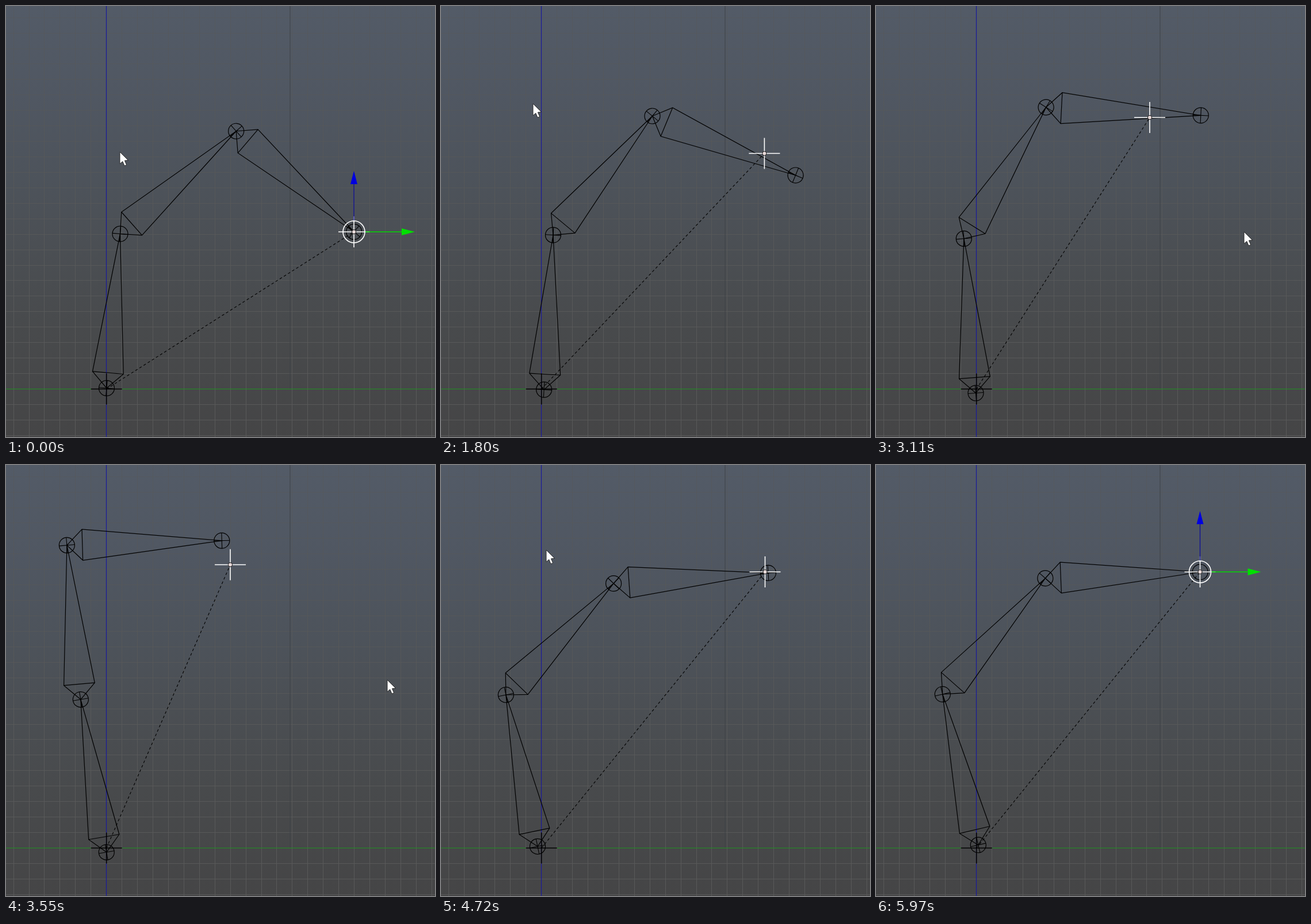
Recreate the animation shown at these times as an HTML page with a canvas. Size 746 px wide and 750 px high, loop 6.07 s.

```html
<!DOCTYPE html>
<html lang="en">
<head>
<meta charset="utf-8">
<title>Bone chain</title>
<style>
html, body { margin: 0; width: 100%; height: 100%; overflow: hidden; background: #4a4d51; }
canvas { display: block; }
</style>
</head>
<body>
<canvas id="stage" width="746" height="750"></canvas>
<script>
const ctx = document.getElementById('stage').getContext('2d');
const W = 746, H = 750, LOOP = 6070;
const BONE = 269.5, JOINT = 13.5, CROSS = 27;
const ORIGIN = { x: 174.7, y: 666.5 };
const POINTER_END = 5280, HANDLES_BACK = 4950;

// runs of evenly spaced steps: [first, last, count]
const steps = [
  [120, 700, 6], [820, 1380, 6], [1480, 2020, 6], [2140, 2690, 6], [2790, 3330, 6],
  [3430, 4030, 6], [4150, 4250, 2], [4390, 4950, 6], [5060, 5620, 6], [5750, 5970, 3]
].flatMap(([first, last, n]) => Array.from({ length: n },
  (_, k) => Math.floor((first + (last - first) * k / (n - 1)) / 10) * 10));

// [time, root x, root y, three bone angles from upright]
const CHAIN = [
  [0, 175, 665, 5, 48.45, 130.5],
  [820, 176, 667, 4, 39.5, 127],
  [1150, 175.5, 666, 4.4, 45, 129.4],
  [1430, 175, 666, 5.5, 49, 130.5],
  [2020, 181, 669, 1.5, 30, 101],
  [2360, 179, 671, -1.1, 5.6, 95.1],
  [2800, 173.5, 675.5, -5.2, 29, 96.5],
  [3110, 173.5, 673.5, -4.4, 32, 93],
  [3430, 174.5, 674.4, -8.7, -3, 82],
  [3550, 174.8, 673.8, -9.6, -5.1, 88.3],
  [4030, 170, 673.5, -16.5, 25, 92],
  [4250, 168, 671, -14, 38, 88],
  [4720, 168, 663.8, -11.8, 44, 86.1],
  [4950, 170, 660.5, -12.3, 43.3, 86.6],
  [5970, 177.8, 661.2, -13.3, 41.5, 87.7]
];

// [time, x, y]
const GOAL = [
  [0, 605, 393], [820, 568, 348], [1150, 604, 390], [1430, 627, 404], [2020, 510, 185],
  [2360, 453, 179], [2800, 578, 214], [3110, 476, 194], [3430, 365, 168],
  [3550, 390, 173.5], [4030, 567, 186], [4250, 563.5, 186]
];

// [time, x, y]; a wide gap is a wrap across the view
const POINTER = [
  [0, 198, 254], [820, 170, 212], [1150, 203, 250], [1380, 224, 262], [1800, 160, 170],
  [1910, 720, 394], [2360, 705, 382], [2580, 190, 410], [3000, 145, 405],
  [3110, 640, 393], [3550, 663, 374], [3780, 130, 150], [4150, 183, 148]
];

function locate(rows, t) {
  let i = 0;
  while (i < rows.length - 2 && rows[i + 1][0] <= t) i++;
  return i;
}

// tangent that never overshoots a turning point
function slope(rows, i, c) {
  if (i === 0 || i === rows.length - 1) return 0;
  const rate = k => (rows[k + 1][c] - rows[k][c]) / (rows[k + 1][0] - rows[k][0]);
  const a = rate(i - 1), b = rate(i);
  return a * b > 0 ? 2 * a * b / (a + b) : 0;
}

function sample(rows, t) {
  const i = locate(rows, t), a = rows[i], b = rows[i + 1];
  const span = b[0] - a[0], u = Math.min(1, (t - a[0]) / span);
  const ease = u * u * (3 - 2 * u);
  return a.map((from, c) => from + (b[c] - from) * ease +
    span * u * (1 - u) * ((1 - u) * slope(rows, i, c) - u * slope(rows, i + 1, c))).slice(1);
}

function pointerAt(t) {
  const i = locate(POINTER, t), a = POINTER[i], b = POINTER[i + 1];
  const wraps = Math.abs(b[1] - a[1]) > 300;
  const u = wraps ? Number(t >= b[0]) : Math.min(1, (t - a[0]) / (b[0] - a[0]));
  return { x: a[1] + (b[1] - a[1]) * u, y: a[2] + (b[2] - a[2]) * u };
}

function trace(points, color, width = 1.2, closed = false) {
  ctx.beginPath();
  points.forEach(([x, y]) => ctx.lineTo(x, y));
  if (closed) ctx.closePath();
  ctx.strokeStyle = color;
  ctx.lineWidth = width;
  ctx.stroke();
}

function ring(x, y, r, color, width) {
  ctx.beginPath();
  ctx.arc(x, y, r, 0, 2 * Math.PI);
  ctx.strokeStyle = color;
  ctx.lineWidth = width;
  ctx.stroke();
}

function fill(points, color) {
  ctx.beginPath();
  points.forEach(([x, y]) => ctx.lineTo(x, y));
  ctx.closePath();
  ctx.fillStyle = color;
  ctx.fill();
}

function plus({ x, y }, r, color, width) {
  trace([[x - r, y], [x + r, y]], color, width);
  trace([[x, y - r], [x, y + r]], color, width);
}

function fade(...stops) {
  const g = ctx.createLinearGradient(0, 0, 0, H);
  stops.forEach(([p, color]) => g.addColorStop(p, color));
  return g;
}

function backdrop() {
  ctx.fillStyle = fade([0, '#535b67'], [0.21, '#505762'], [0.4, '#4d535b'],
    [0.55, '#4b4f54'], [0.75, '#484a4c'], [1, '#454546']);
  ctx.fillRect(0, 0, W, H);

  const ink = fade([0, '#58575466'], [0.22, '#58585699'], [0.6, '#595a5ae6'], [1, '#5a5a5af2']);
  const cell = 26.93;
  for (let x = ORIGIN.x % cell; x < W; x += cell) {
    const px = Math.floor(x) + 0.5;
    trace([[px, 0], [px, H]], ink, 1);
  }
  for (let y = ORIGIN.y % cell; y < H; y += cell) {
    const py = Math.floor(y) + 0.5;
    trace([[0, py], [W, py]], ink, 1);
  }
  trace([[494, 0], [494, 666]], '#3e4246', 1);
  trace([[0, 666.5], [W, 666.5]], '#209020', 1);
  trace([[174.5, 0], [174.5, H]], '#1a1a9c', 1.2);
}

function joint(p, angle) {
  ctx.save();
  ctx.translate(p.x, p.y);
  ctx.rotate(angle);
  ring(0, 0, JOINT, '#000', 1.2);
  plus({ x: 0, y: 0 }, JOINT, '#000', 1.1);
  ctx.restore();
}

function bone(base, angle) {
  const dx = Math.sin(angle), dy = -Math.cos(angle), q = BONE / 10;
  const tip = { x: base.x + BONE * dx, y: base.y + BONE * dy };
  const left = [base.x + q * (dx + dy), base.y + q * (dy - dx)];
  const right = [base.x + q * (dx - dy), base.y + q * (dy + dx)];
  trace([[base.x, base.y], left, [tip.x, tip.y], right], '#000', 1.2, true);
  trace([left, right], '#000');
  joint(tip, angle);
  return tip;
}

function handles({ x, y }) {
  ring(x, y, 19, '#fff', 1.6);
  trace([[x, y - 20], [x, y - 83]], '#0a0a9c', 1.2);
  fill([[x, y - 106], [x - 6, y - 83], [x + 6, y - 83]], '#0000e0');
  trace([[x + 20, y], [x + 83, y]], '#00d800', 1.5);
  fill([[x + 106, y], [x + 83, y - 6], [x + 83, y + 6]], '#00e000');
}

function arrow({ x, y }) {
  const shape = [[0, 0], [0, 20.5], [4.8, 16.5], [8, 24], [11.6, 22.5], [8.4, 15], [14.5, 14.5]]
    .map(([px, py]) => [x + px, y + py]);
  fill(shape, '#fff');
  trace(shape, '#222', 0.9, true);
}

function draw(t) {
  const [rx, ry, ...angles] = sample(CHAIN, t);
  const [gx, gy] = sample(GOAL, t);
  const root = { x: rx, y: ry }, goal = { x: gx, y: gy };
  const turns = angles.map(a => a * Math.PI / 180);
  backdrop();
  plus(ORIGIN, CROSS, '#000', 1.5);

  ctx.setLineDash([4.5, 4]);
  trace([[ORIGIN.x, ORIGIN.y], [gx, gy]], '#000', 1.1);
  ctx.setLineDash([]);

  joint(root, turns[0]);
  turns.reduce((base, angle) => bone(base, angle), root);

  plus(goal, CROSS, '#fff', 1.6);
  if (t < 120 || t >= HANDLES_BACK) handles(goal);
  ctx.beginPath();
  ctx.arc(gx, gy, 3.6, 0, 2 * Math.PI);
  ctx.fillStyle = '#e8dada';
  ctx.fill();
  ring(gx, gy, 3.6, '#111', 1);
  if (t < POINTER_END) arrow(pointerAt(t));
}

const start = performance.now();
function tick() {
  const t = (performance.now() - start) % LOOP;
  draw(steps.findLast(s => s <= t) ?? 0);
  requestAnimationFrame(tick);
}
tick();
</script>
</body>
</html>
```
